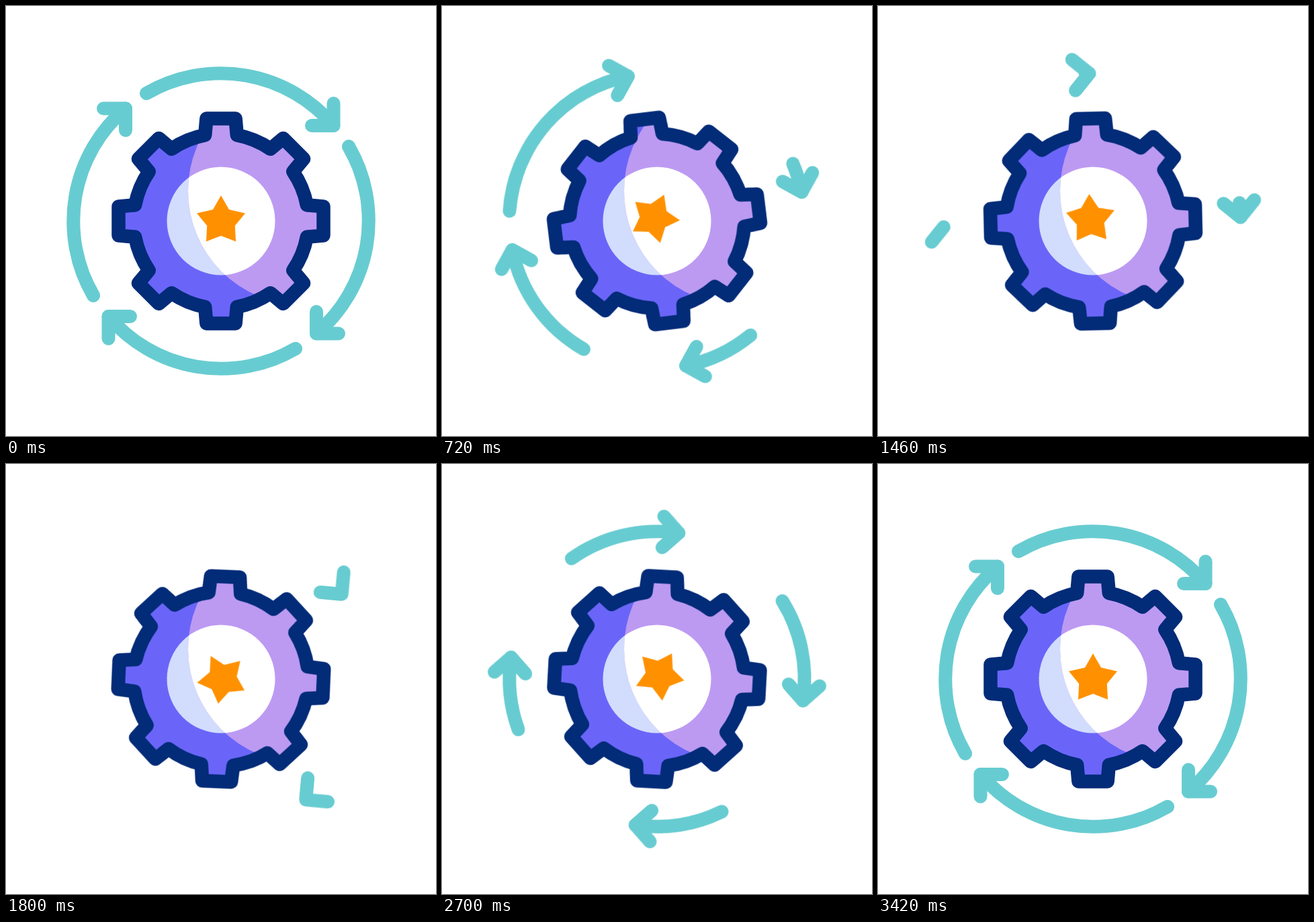
Recreate the animation shown at these times as an HTML page without scripts. Size 640 by 640 pixels, loop 3600 ms.

```html
<!DOCTYPE html>
<html lang="en">
<head>
<meta charset="utf-8">
<title>Gear cycle</title>
<style>
  html, body { margin: 0; width: 100%; height: 100%; overflow: hidden; background: #fff; }
  svg { display: block; width: 100vw; height: 100vh; }

  :root {
    --loop: 3.6s infinite both;
    --smooth: cubic-bezier(.3333, 0, .6667, 1);
    --gather: cubic-bezier(.3333, 0, .6667, .3333);
  }

  .ring, .gear, .star { transform-origin: 320px 320px; animation: turn var(--loop) var(--smooth); }
  .gear { animation-name: swing; }
  .star { animation-name: spin; transform-origin: 320px 316.2px; fill: #ff9100; }

  .ring { fill: none; stroke: #67ccd1; stroke-width: 20; stroke-linecap: round; stroke-linejoin: round; }
  .ring path { stroke-dasharray: 1 3; animation: var(--loop) var(--smooth); }
  .rim { fill: none; stroke: #022b78; stroke-width: 20.5; stroke-linejoin: round; }

  @keyframes turn {
    0%, 4.44% { transform: rotate(0deg); }
    93.89%, 100% { transform: rotate(360deg); }
  }
  @keyframes swing {
    0%, 4.44% { transform: rotate(0deg); }
    27.44% { transform: rotate(110deg); }
    64.67% { transform: rotate(-122deg); }
    93.89%, 100% { transform: rotate(0deg); }
  }
  @keyframes spin {
    0%, 4.44% { transform: rotate(0deg); }
    28.47% { transform: rotate(132deg); }
    67.5% { transform: rotate(-142.5deg); }
    93.89%, 100% { transform: rotate(0deg); }
  }

  /* Each line is erased from its start, then drawn back from its end. */
  .a .arc { animation-name: arc-a; }
  .b .arc { animation-name: arc-b; }
  .c .arc { animation-name: arc-c; }
  .d .arc { animation-name: arc-d; }
  .a .head { animation-name: head-a; }
  .b .head { animation-name: head-b; }
  .c .head { animation-name: head-c; }
  .d .head { animation-name: head-d; }

  @keyframes arc-a {
    0%, 4.5% { stroke-dashoffset: 0; animation-timing-function: var(--gather); }
    33.3%, 61.6% { stroke-dashoffset: -1.02; }
    86.6%, 100% { stroke-dashoffset: 0; }
  }
  @keyframes arc-b {
    0%, 9.3% { stroke-dashoffset: 0; animation-timing-function: var(--gather); }
    38.3%, 62.3% { stroke-dashoffset: -1.02; }
    87.3%, 100% { stroke-dashoffset: 0; }
  }
  @keyframes arc-c {
    0%, 10.6% { stroke-dashoffset: 0; animation-timing-function: var(--gather); }
    50.3%, 63.5% { stroke-dashoffset: -1.02; }
    88.5%, 100% { stroke-dashoffset: 0; }
  }
  @keyframes arc-d {
    0%, 17.2% { stroke-dashoffset: 0; animation-timing-function: var(--gather); }
    53.6%, 64.75% { stroke-dashoffset: -1.02; }
    89.75%, 100% { stroke-dashoffset: 0; }
  }
  @keyframes head-a {
    0%, 33.1% { stroke-dashoffset: 0; animation-timing-function: linear; }
    38.6%, 59.2% { stroke-dashoffset: -1.02; }
    67.5%, 100% { stroke-dashoffset: 0; }
  }
  @keyframes head-b {
    0%, 38% { stroke-dashoffset: 0; animation-timing-function: linear; }
    42.7%, 59.8% { stroke-dashoffset: -1.02; }
    68.1%, 100% { stroke-dashoffset: 0; }
  }
  @keyframes head-c {
    0%, 50% { stroke-dashoffset: 0; animation-timing-function: linear; }
    54.7%, 61% { stroke-dashoffset: -1.02; }
    69.3%, 100% { stroke-dashoffset: 0; }
  }
  @keyframes head-d {
    0%, 53.3% { stroke-dashoffset: 0; animation-timing-function: linear; }
    58%, 62% { stroke-dashoffset: -1.02; }
    70.5%, 100% { stroke-dashoffset: 0; }
  }
</style>
</head>
<body>
<svg viewBox="0 0 640 640">
  <defs>
    <path id="cog" d="M296.2 192.2L298.4 167.5H341.6L343.8 192.2
      A130 130 0 0 1 393.5 212.8L412.6 196.9L443.1 227.4L427.2 246.5
      A130 130 0 0 1 447.8 296.2L472.5 298.4V341.6L447.8 343.8
      A130 130 0 0 1 427.2 393.5L443.1 412.6L412.6 443.1L393.5 427.2
      A130 130 0 0 1 343.8 447.8L341.6 472.5H298.4L296.2 447.8
      A130 130 0 0 1 246.5 427.2L227.4 443.1L196.9 412.6L212.8 393.5
      A130 130 0 0 1 192.2 343.8L167.5 341.6V298.4L192.2 296.2
      A130 130 0 0 1 212.8 246.5L196.9 227.4L227.4 196.9L246.5 212.8
      A130 130 0 0 1 296.2 192.2Z"/>
    <clipPath id="lit"><circle cx="441" cy="275" r="170"/></clipPath>
  </defs>

  <g class="ring">
    <g class="a">
      <path class="arc" pathLength="1" d="M209 130A220 220 0 0 1 487.5 178"/>
      <path class="head" pathLength="1" d="M487.5 145V178H455"/>
    </g>
    <g class="b" transform="rotate(90 320 320)">
      <path class="arc" pathLength="1" d="M209 130A220 220 0 0 1 487.5 178"/>
      <path class="head" pathLength="1" d="M455 178H487.5V145"/>
    </g>
    <g class="c" transform="rotate(180 320 320)">
      <path class="arc" pathLength="1" d="M209 130A220 220 0 0 1 487.5 178"/>
      <path class="head" pathLength="1" d="M455 178H487.5V145"/>
    </g>
    <g class="d" transform="rotate(270 320 320)">
      <path class="arc" pathLength="1" d="M209 130A220 220 0 0 1 487.5 178"/>
      <path class="head" pathLength="1" d="M455 178H487.5V145"/>
    </g>
  </g>

  <g class="gear"><use href="#cog" fill="#6a65f8"/></g>
  <circle cx="320" cy="320" r="80.5" fill="#d2dcfd"/>
  <g clip-path="url(#lit)">
    <g class="gear"><use href="#cog" fill="#bc9af2"/></g>
    <circle cx="320" cy="320" r="80.5" fill="#fff"/>
  </g>
  <g class="gear"><use href="#cog" class="rim"/></g>

  <path class="star" d="M320 282L332 303L356 308.5L340.8 327L342 350.5L320 342L298 350.5L299.2 327L284 308.5L308 303Z"/>
</svg>
</body>
</html>
```
